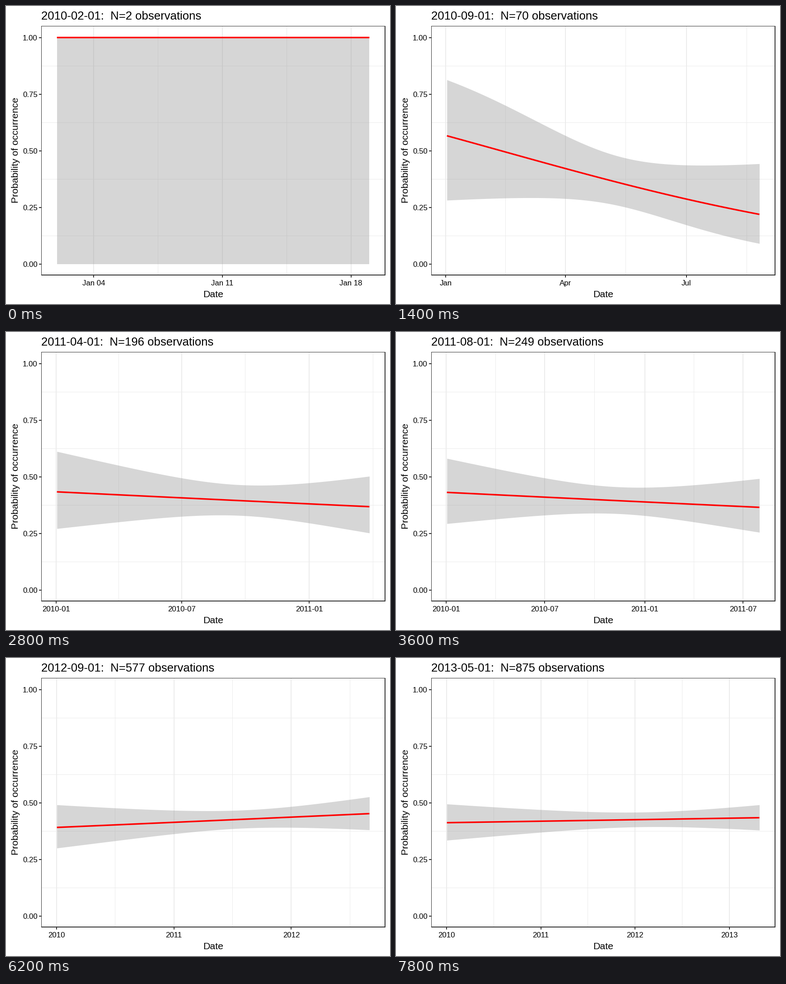
A matplotlib script for the animation above (8 s loop, 850 px wide and 658 px high).

```python
import numpy as np
import matplotlib.pyplot as plt
from matplotlib.animation import FuncAnimation

W, H, DPI = 850, 658, 64
PX = 72 / DPI  # points per pixel
MONTHS = 40
LEFT, RIGHT, TOP, BOTTOM = 78, 840, 44, 595
X0, X1 = 112.7, 804.4  # ends of the data
Y0, Y1 = 569.6, 69.6  # probability 0 and 1
NAMES = "Jan Feb Mar Apr May Jun Jul Aug Sep Oct Nov Dec".split()
DARK, GRID = "#333333", "#ebebeb"

plt.rcParams["font.family"] = "Liberation Sans"
fig = plt.figure(figsize=(W / DPI, H / DPI), dpi=DPI, facecolor="white")
ax = fig.add_axes([0, 0, 1, 1])


def day(text):
    return int(np.datetime64(text, "D").astype(int))


START = day("2010-01-02")
# days between the last observation and the date in the title
LAGS = {0: 13, 1: 7, 2: 2, 7: 7, 11: 1, 18: 1, 25: 7, 31: 1, 39: 4}

# logistic fit by month: logit at both ends,
# half width of the band at both ends and at its waist
KNOTS = [1, 7, 11, 18, 25, 31, 39]
FITS = np.array([
    [0.90, 0.30, 2.40, 2.00, 0.900],
    [0.266, -1.271, 1.204, 1.040, 0.480],
    [-0.261, -0.532, 0.825, 0.572, 0.316],
    [-0.278, -0.554, 0.604, 0.521, 0.249],
    [-0.498, -0.180, 0.4615, 0.3315, 0.190],
    [-0.443, -0.193, 0.4055, 0.297, 0.164],
    [-0.356, -0.266, 0.333, 0.229, 0.133],
])
COUNT_AT = [0, 7, 11, 18, 25, 31, 39]
COUNTS = [2, 70, 157, 249, 427, 577, 875]


def month_starts(step):
    months = np.arange("2009-01", "2015-01", step, dtype="datetime64[M]")
    return months.astype("datetime64[D]").astype(int)


firsts = month_starts(1)
SCALES = [
    ("day", day("2009-01-05") + 7 * np.arange(300)),
    ("day", np.sort(np.concatenate([firsts, firsts + 14]))),
    ("month", firsts),
    ("month", month_starts(3)),
    ("half", month_starts(6)),
    ("year", month_starts(12)),
]


def pick_breaks(a, b):
    """Choose the scale whose breaks split a..b into nearly five parts."""
    def misfit(scale):
        marks = scale[1]
        lo = np.searchsorted(marks, a, "right") - 1
        return abs(np.searchsorted(marks, b) - lo - 5)

    kind, marks = min(SCALES, key=misfit)
    return kind, marks[(marks >= a) & (marks <= b)]


def labels(kind, marks):
    parts = [str(np.datetime64(int(m), "D")).split("-") for m in marks]
    many_years = len({year for year, _, _ in parts}) > 1
    for year, month, date in parts:
        name = NAMES[int(month) - 1]
        if kind == "day":
            yield f"{name} {date}"
        elif kind == "month":
            yield f"{name} {year}" if many_years else name
        else:
            yield f"{year}-{month}" if kind == "half" else year


def fit(k, t):
    """Curve and band limits at positions t from 0 to 1."""
    if k == 0:
        return np.ones_like(t), np.zeros_like(t), np.ones_like(t)
    l0, l1 = (np.interp(k, KNOTS, FITS[:, i]) for i in (0, 1))
    h0, h1, waist = (np.exp(np.interp(k, KNOTS, np.log(FITS[:, i])))
                     for i in (2, 3, 4))
    a = np.sqrt(h0 ** 2 - waist ** 2)
    b = np.sqrt(h1 ** 2 - waist ** 2)
    half = np.sqrt(waist ** 2 + ((a + b) * t - a) ** 2)
    mid = l0 + (l1 - l0) * t
    return [1 / (1 + np.exp(-v)) for v in (mid, mid - half, mid + half)]


def y_pos(p):
    return Y0 + (Y1 - Y0) * p


def line(xs, ys, color, width, z):
    ax.plot(xs, ys, color=color, lw=width * PX, zorder=z,
            solid_capstyle="butt", snap=False)


def across(y, color, width, z, x0=LEFT, x1=RIGHT):
    line([x0, x1], [y, y], color, width, z)


def down(x, color, width, z, y0=TOP, y1=BOTTOM):
    line([x, x], [y0, y1], color, width, z)


def on_pixel(v):
    return np.floor(v) + 0.5


def text(x, y, s, size, ha="center", **kw):
    ax.text(x, y, s, fontsize=size * PX, ha=ha, va="baseline",
            color="black", rotation_mode="anchor", **kw)


def draw_y_axis():
    for p in np.arange(0.125, 1, 0.25):
        across(on_pixel(y_pos(p)), GRID, 1, 1)
    for p in np.arange(0, 1.01, 0.25):
        y = y_pos(p)
        across(round(y), DARK, 2, 5, 73, 78)
        text(69.7, y + 6.5, f"{p:.2f}", 16.8, "right")
    text(27.3, 318.5, "Probability of occurrence", 21.3, rotation=90)


def draw_x_axis(k):
    end = int(firsts[13 + k]) - LAGS.get(k, 3)
    scale = (X1 - X0) / (end - START)
    pad = (end - START) * 0.05
    kind, marks = pick_breaks(START - pad, end + pad)
    xs = X0 + (marks - START) * scale
    ext = np.concatenate([[2 * xs[0] - xs[1]], xs, [2 * xs[-1] - xs[-2]]])
    for x in (ext[1:] + ext[:-1]) / 2:
        if LEFT < x < RIGHT:
            down(on_pixel(x), GRID, 1, 1)
    for x, s in zip(xs, labels(kind, marks)):
        down(round(x), GRID, 2, 1)
        down(round(x), DARK, 2, 5, BOTTOM, 599.5)
        text(x, 616.7, s, 16.8)
    text(458.3, 643, "Date", 21.3)


def draw_border():
    across(44.5, DARK, 1, 6)
    across(594, DARK, 2, 6)
    down(78.5, DARK, 1, 6)
    down(839, DARK, 2, 6)


def draw(k):
    ax.clear()
    ax.set(xlim=(0, W), ylim=(H, 0))
    ax.axis("off")
    draw_y_axis()
    draw_x_axis(k)

    t = np.linspace(0, 1, 80)
    x = X0 + (X1 - X0) * t
    mid, low, high = (y_pos(p) for p in fit(k, t))
    ax.fill_between(x, low, high, color="#999999", alpha=0.4, lw=0, zorder=2)
    line(x, mid, "red", 3.4, 3)
    draw_border()

    date = np.datetime64("2010-02") + k
    count = round(float(np.interp(k, COUNT_AT, COUNTS)))
    text(77.6, 30, f"{date}-01:  N={count} observations", 25.75, "left")
    return ax.get_children()


anim = FuncAnimation(fig, draw, frames=MONTHS, interval=200,
                     repeat=True, repeat_delay=0, blit=False)
plt.show()
```
